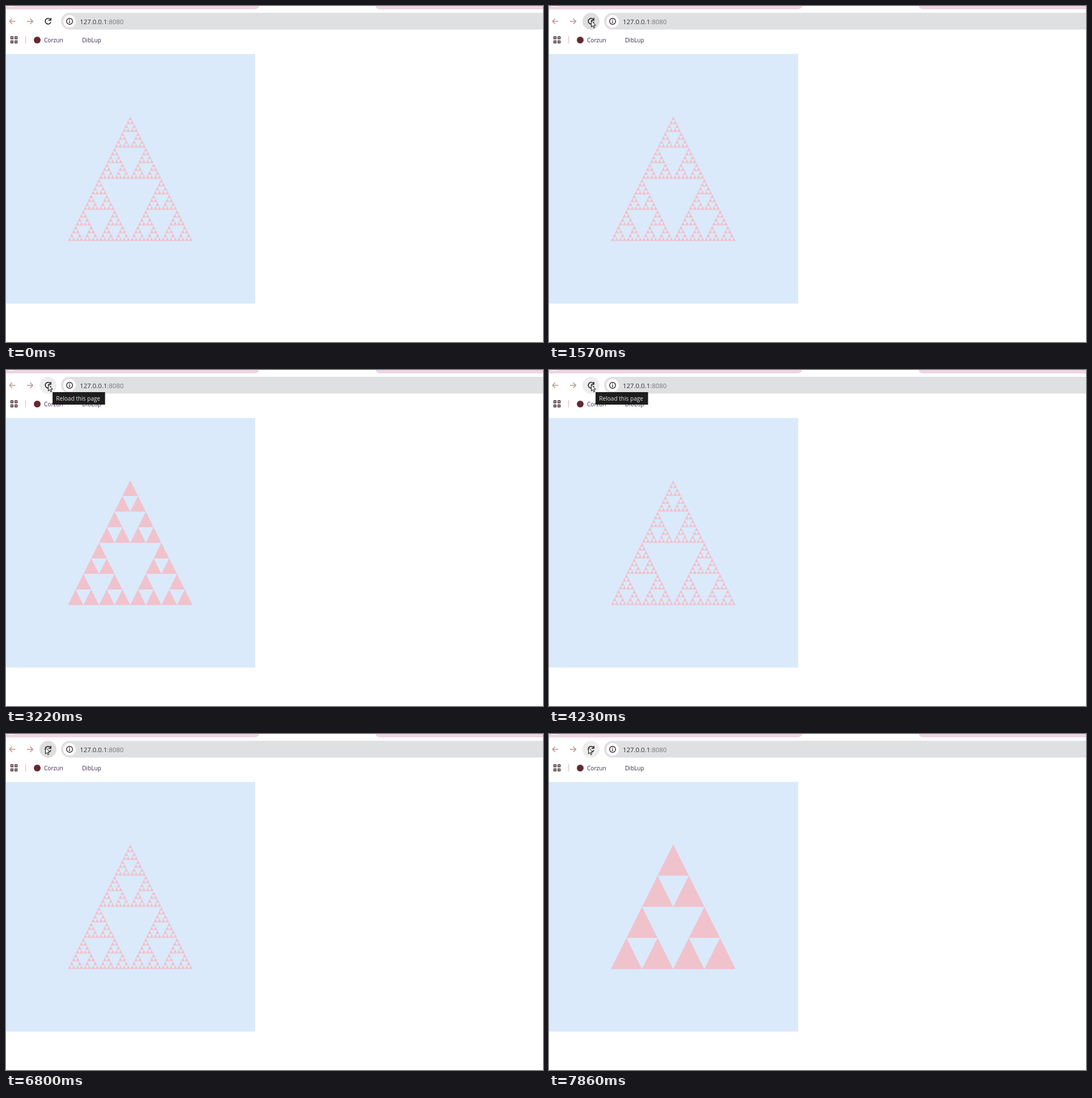
An HTML page for the animation above (8 s loop, 946 px wide and 592 px high).

```html
<!DOCTYPE html>
<html lang="en">
<head>
<meta charset="utf-8">
<title>Sierpinski triangle</title>
<style>
  html, body { margin: 0; width: 100%; height: 100%; overflow: hidden; background: #fff; }
  svg { display: block; width: 946px; height: 592px; }
  text { font-family: "Open Sans", "Noto Sans", sans-serif; font-size: 10.1px; fill: #3a2d4d; }
  .line { fill: none; stroke-width: 1.5; }
</style>
</head>
<body>
<svg viewBox="0 0 946 592">
  <!-- tab strip -->
  <path fill="#eed5e3" d="M0 0H446Q444 6 437 6H0ZM651 0H946V6H660Q653 6 651 0Z"/>
  <ellipse cx="9" cy="-1" rx="8" ry="2" fill="#fff"/>

  <!-- toolbar -->
  <rect x="97" y="12" width="870" height="29.5" rx="14.75" fill="#dfe0e1"/>
  <circle cx="112" cy="27" r="11" fill="#fff"/>
  <g class="line" stroke="#b9978f">
    <path d="M16.5 27H6.5M11 22.2L6.2 27L11 31.8"/>
    <path d="M37 27H47M42.5 22.2L47.3 27L42.5 31.8"/>
  </g>
  <circle id="hover" cx="74" cy="27" r="15"/>
  <path class="line" stroke="#1f191b" d="M78 23.6A5 5 0 1 0 79 28.2"/>
  <path fill="#1f191b" d="M79.8 21V26H74.8V24.5H78.2V21Z"/>
  <g class="line" stroke="#35242b">
    <circle cx="112" cy="27" r="5.3" stroke-width="1.4"/>
    <path d="M112 26.4V30M112 23.8V25.2"/>
  </g>
  <text x="130" y="31.5" style="font-size:11.4px;fill:#38303a">127.0.0.1<tspan fill="#77747a">:8080</tspan></text>

  <!-- bookmarks -->
  <path class="line" stroke="#3a222b" d="M8.7 54.2h3.6v3.6h-3.6zM15.9 54.2h3.6v3.6h-3.6zM8.7 61.4h3.6v3.6h-3.6zM15.9 61.4h3.6v3.6h-3.6z"/>
  <path class="line" stroke="#eec3cd" d="M34.5 53V66"/>
  <circle cx="55" cy="60" r="6" fill="#652832"/>
  <text x="67" y="63.5">Corzun</text>
  <text x="134" y="63.5">DibLup</text>

  <!-- page -->
  <rect y="84.5" width="439" height="439.7" fill="#daeafb"/>
  <path id="fractal" fill="#f0c2cc"/>

  <g id="tip">
    <rect x="82" y="39" width="92.5" height="22" fill="#1d1d1d"/>
    <text x="88.3" y="53.6" style="fill:#e6e6e6">Reload this page</text>
  </g>
  <path id="cursor" fill="#fff" stroke="#111" stroke-width="1"
        d="M.5 .7V12L3 9.7L4.8 13.7L6.6 12.9L4.8 9H8.2Z"/>
</svg>
<script>
const LOOP = 8000;
const $ = id => document.getElementById(id);
const hover = $('hover'), fractal = $('fractal'), tip = $('tip'), cursor = $('cursor');

// [time, subdivision depth]
const depths = [[0, 5], [1700, 0], [2230, 1], [2690, 2], [3220, 3], [3700, 4], [4230, 5],
                [6870, 0], [7330, 1], [7860, 2]];
// [time, x, y] of the pointer
const route = [[120, 773, 511], [270, 380, 299], [470, 380, 299], [1290, 74, 25], [5620, 74, 25],
               [5690, 76, 26], [6020, 198, 36], [6450, 69, 23], [LOOP, 69, 23]];
const presses = [[1430, 1700], [6590, 6870]];

// Isosceles triangle with apex (x, y), as wide as it is high
function triangles(x, y, size, depth) {
  if (!depth) return `M${x} ${y}l${size / 2} ${size}h${-size}z`;
  const h = size / 2;
  return triangles(x, y, h, depth - 1) +
         triangles(x - h / 2, y + h, h, depth - 1) +
         triangles(x + h / 2, y + h, h, depth - 1);
}
const shapes = [0, 1, 2, 3, 4, 5].map(d => triangles(218.8, 194.5, 219.8, d));

function pointer(t) {
  const i = route.findIndex(k => t < k[0]);
  const [t0, x0, y0] = route[i - 1], [t1, x1, y1] = route[i];
  const u = (t - t0) / (t1 - t0), e = u * u * (3 - 2 * u);
  return [x0 + (x1 - x0) * e, y0 + (y1 - y0) * e];
}

const show = (el, on) => el.setAttribute('visibility', on ? 'visible' : 'hidden');
let drawn = -1;

function draw(t) {
  const depth = depths.filter(k => k[0] <= t).pop()[1];
  if (depth !== drawn) fractal.setAttribute('d', shapes[drawn = depth]);

  const visible = t >= 120;
  const [x, y] = visible ? pointer(t) : [800, 520];
  show(cursor, visible);
  cursor.setAttribute('transform', `translate(${x} ${y})`);

  show(hover, Math.hypot(x - 74, y - 27) < 15);
  const pressed = presses.some(([a, b]) => t >= a && t < b);
  hover.setAttribute('fill', pressed ? '#dedede' : '#ededed');
  show(tip, t >= 2100 && t < 5830);
}

function frame() {
  draw(performance.now() % LOOP);
  requestAnimationFrame(frame);
}
frame();
</script>
</body>
</html>
```
